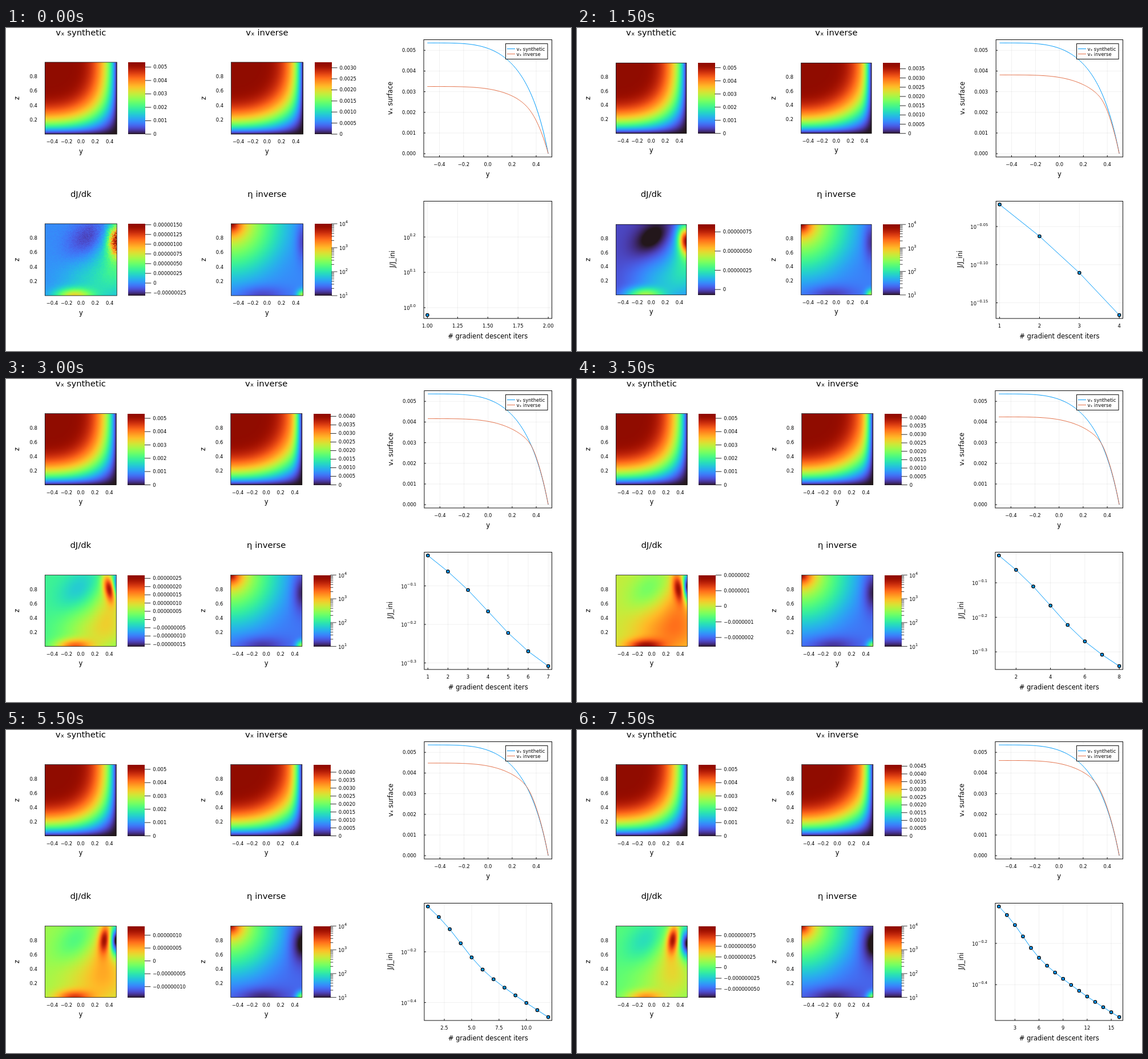
These frames come from a looping animation (990 by 566 pixels, 8 s). An HTML page with a canvas:

```html
<!DOCTYPE html>
<html>
<head>
<meta charset="utf-8">
<style>
html, body { margin: 0; width: 990px; height: 566px; overflow: hidden; background: #fff; }
canvas { display: block; }
</style>
</head>
<body>
<canvas id="stage" width="990" height="566"></canvas>
<script>
const ctx = document.getElementById('stage').getContext('2d');
const FONT = '"DejaVu Sans", sans-serif';
const BLUE = '#009afa', ORANGE = '#e36f47';
const N = 126, RIGHT = 956.5, VMAX = 0.00536, STEPS = 16;

const bell = (d, s) => Math.exp(-d * d / (2 * s * s));
const hash = (i, j) => {
  const s = Math.sin(i * 12.9898 + j * 78.233) * 43758.5453;
  return s - Math.floor(s) - .5;
};

// log10 of the misfit: a steady descent, fastest around the fourth step
const misfit = [-.0211];
for (let i = 1; i < STEPS; i++)
  misfit.push(misfit[i - 1] - (.0385 - .001 * i + .022 * bell(i - 3.65, 1.45)));

function turbo(x) {
  const t = Math.min(1, Math.max(0, x));
  return [
    34.61 + t * (1172.33 - t * (10793.56 - t * (33300.12 - t * (38394.49 - t * 14825.05)))),
    23.31 + t * (557.33 + t * (1225.33 - t * (3574.96 - t * (1073.77 + t * 707.56)))),
    27.2 + t * (3211.1 - t * (15327.97 - t * (27814 - t * (22569.18 - t * 6838.66))))
  ];
}

// Scalar fields: u runs left to right, z bottom to top, both 0..1
const synth = u => 1 - .78 * u ** 4 - .22 * u ** 11;
const flow = profile => (u, z) => {
  const w = 1 - z;
  return profile(u) * (1 - w ** 4) * (1 - (u * w) ** 2);
};

// Inverse surface speed: a plateau that meets the wall profile
const inverseTop = step => .00475 - .0015 * Math.exp(-step / 6.4);

function inverseProfile(step) {
  const k = 10 + step, top = inverseTop(step);
  const scale = 1.03 - .33 * Math.exp(-((step / 2.8) ** 1.8));
  const raw = u => {
    const flat = top * (1 - .5 * u ** 4), wall = VMAX * scale * synth(u);
    return wall <= 1e-9 ? 0 : (flat ** -k + wall ** -k) ** (-1 / k);
  };
  const full = raw(0);
  return u => raw(u) / full;
}

// The gradient at the right wall changes sign at about step 5
const flip = step => 1 / (1 + Math.exp((5.3 - step) / .5));

// Colour range in units of 1e-7; the first step is noisy and spreads it
function gradientRange(step) {
  const hi = 2.4 - .095 * step + 9.4 * Math.exp(-((step / 4.3) ** 2.6));
  const lo = -1.5 * Math.exp(-step / 4) - 8.8 * Math.exp(-step / 5.8) * flip(step) ** 4;
  const spread = step === 0 ? hi - lo : 0;
  return [lo - .13 * spread, hi + .26 * spread];
}

function gradientField(step) {
  const [lo, hi] = gradientRange(step), f = flip(step);
  const zero = -lo / (hi - lo);
  const dipU = .4 + .19 * Math.exp(-step / 6);
  const peakU = 1 - f * (.06 + .0095 * step), peakZ = .77 + .05 * f;
  const tilt = .3 * bell(step - 6, 2) - .1 * f;
  const broad = .13 + .08 * bell(step - 5, 2);
  return (u, z, i, j) => {
    const core = bell(u - peakU - tilt * (peakZ - z), .075 - .018 * f) * bell(z - peakZ, .14);
    const halo = bell(u - peakU, .16) * bell(z - .62, .28);
    let t = zero + (1 - zero) * (.72 * core + .24 * halo)
      - .11 * bell(u - dipU - .45 * (z - .8), .19) * bell(z - .8, .2)
      - 1.2 * f * zero * bell(u - 1, .02 + .0035 * step) * bell(z - .9 + .01 * step, .14)
      + (.38 - .009 * step) * bell(u - .4, .18) * bell(z, .07)
      + broad * bell(u - .75, .35) * bell(z - .2, .26);
    if (step === 0) t += hash(i, j) * (.015 + .05 * u * z + .4 * core);
    return t;
  };
}

function viscosityField(step) {
  const p = Math.min(1, step / 12);
  return (u, z) => {
    const r = Math.hypot(u, 1 - z);
    return .17 - .05 * p + .32 * Math.exp(-((r / .7) ** 3)) + .5 * Math.exp(-((r / .18) ** 1.3))
      - (.11 + .05 * p) * bell(u - 1, .07 + .05 * p) * bell(z - .76, .2)
      - .1 * bell(u - .42, .25) * bell(z, .1)
      + .38 * bell(u - 1, .055) * bell(z, .055);
  };
}

// Drawing helpers
function text(s, x, y, size = 8.4, align = 'center') {
  ctx.font = size + 'px ' + FONT;
  ctx.textAlign = align;
  ctx.fillStyle = '#000';
  ctx.fillText(s, x, y);
}

function upright(s, x, y) {
  ctx.save();
  ctx.translate(x, y);
  ctx.rotate(-Math.PI / 2);
  text(s, 0, 0, 11.5);
  ctx.restore();
}

function path(points, color, width = 1) {
  ctx.beginPath();
  points.forEach(([x, y]) => ctx.lineTo(x, y));
  ctx.strokeStyle = color;
  ctx.lineWidth = width;
  ctx.stroke();
}

function box(x, y, w, h, width = 1) {
  ctx.strokeStyle = '#111';
  ctx.lineWidth = width;
  ctx.strokeRect(x, y, w, h);
}

function power(exp, x, y, align) {
  const size = 6.6;
  ctx.font = '8.4px ' + FONT;
  const base = ctx.measureText('10').width;
  ctx.font = size + 'px ' + FONT;
  const left = align === 'right' ? x - base - ctx.measureText(exp).width : x;
  text('10', left, y + 4.3, 8.4, 'left');
  text(exp, left + base, y - .8, size, 'left');
}

function ticks(lo, hi, step) {
  const out = [];
  for (let i = Math.ceil(lo / step - 1e-6); i <= Math.floor(hi / step + 1e-6); i++) out.push(i * step);
  return out;
}

function decimals(step) {
  let d = 0;
  for (; Math.abs(step - Math.round(step)) > 1e-4 || Math.round(step) === 0; d++) step *= 10;
  return d;
}

const format = (v, step) =>
  (Math.abs(v) < step / 2 ? 0 : v).toFixed(decimals(step)).replace('-', '−');

const buffer = document.createElement('canvas');
const bufferCtx = buffer.getContext('2d');

function paint(x, y, w, h, cols, field) {
  buffer.width = cols;
  buffer.height = N;
  const img = bufferCtx.createImageData(cols, N);
  for (let j = 0, o = 0; j < N; j++)
    for (let i = 0; i < cols; i++, o += 4) {
      img.data.set(turbo(field((i + .5) / cols, 1 - (j + .5) / N, i, j)), o);
      img.data[o + 3] = 255;
    }
  bufferCtx.putImageData(img, 0, 0);
  ctx.drawImage(buffer, x, y, w, h);
}

function heatmap(title, x, y, size, titleY, field) {
  const end = y + size, mid = x + size / 2;
  paint(x, y, size, size, N, field);
  box(x, y, size, size, .8);
  text(title, mid, titleY, 14.8);
  ticks(-.4, .4, .2).forEach(v => text(format(v, .2), x + size * (v + .5), end + 16));
  ticks(.2, .8, .2).forEach(v => text(format(v, .2), x - 13.5, end - size * v + 3, 8.4, 'right'));
  text('y', mid, end + 33.5, 11.5);
  upright('z', x - 45, y + size / 2);
  const top = Math.round(y);
  paint(Math.round(x + size + 20), top, 30, Math.round(end) - top, 1, (u, z) => z);
}

function barTicks(x, y, size, lo, hi, step) {
  const edge = x + size + 49.5;
  ticks(lo, hi, step).forEach(v => {
    const ty = y + size * (hi - v) / (hi - lo);
    path([[edge, ty], [edge + 10.5, ty]], '#111', .9);
    text(Math.abs(v) < step / 2 ? '0' : format(v, step), edge + 14.5, ty + 3, 8.4, 'left');
  });
}

function logTicks(x, y, size) {
  const edge = x + size + 49.5;
  for (let d = 0; d <= 3; d++)
    for (let m = 1; m <= (d < 3 ? 9 : 1); m++) {
      const ty = y + size * (1 - (d + Math.log10(m)) / 3);
      path([[edge, ty], [edge + (m === 1 ? 10.5 : 5), ty]], '#111', .8);
      if (m === 1) power(String(d + 1), edge + 14, ty, 'left');
    }
}

function frame(left, top, bottom, xs, ys) {
  xs.forEach(x => path([[x, top], [x, bottom]], 'rgba(0,0,0,.06)'));
  ys.forEach(y => path([[left, y], [RIGHT, y]], 'rgba(0,0,0,.06)'));
  xs.forEach(x => path([[x, bottom], [x, bottom - 3]], '#111'));
  ys.forEach(y => path([[left, y], [left + 3, y]], '#111'));
  box(left, top, RIGHT - left, bottom - top);
}

function surfacePlot(left, top, profile) {
  const x0 = left + 6.35, w = RIGHT - 6.35 - x0;
  const px = u => x0 + w * u, py = v => 220.2 - 36200 * v;
  const xs = ticks(-.4, .4, .2), ys = ticks(0, .005, .001);
  frame(left, 20.5, 226, xs.map(v => px(v + .5)), ys.map(py));
  xs.forEach(v => text(format(v, .2), px(v + .5), 241.5));
  ys.forEach(v => text(format(v, .001), left - 14, py(v) + 3, 8.4, 'right'));
  text('y', (left + RIGHT) / 2, 260, 11.5);
  upright('vₓ surface', left - 55, 123);
  const curve = f => Array.from({ length: 101 }, (_, i) => [px(i / 100), py(f(i / 100))]);
  path(curve(u => VMAX * synth(u)), BLUE);
  path(curve(u => top * profile(u)), ORANGE);
  ctx.fillStyle = '#fff';
  ctx.fillRect(875.5, 27.5, 73.5, 27);
  box(875.5, 27.5, 73.5, 27);
  [['vₓ synthetic', BLUE, 36.5], ['vₓ inverse', ORANGE, 45.5]].forEach(([s, c, y]) => {
    path([[878, y], [892, y]], c);
    text(s, 894.5, y + 3, 8.4, 'left');
  });
}

function misfitRange(step) {
  const lo = misfit[step], hi = step ? misfit[0] : lo + .313;
  return { lo, hi, yStep: [.025, .05, .1, .2].find(s => (hi - lo) / s < 3.53) };
}

function misfitPlot(left, step, extra) {
  const { lo, hi, yStep } = misfitRange(step);
  const n = step + 1, xMax = Math.max(2, n);
  const x0 = left + 6.35, w = RIGHT - 6.35 - x0;
  const px = v => x0 + w * (v - 1) / (xMax - 1);
  const py = v => 309.3 + 193.8 * (hi - v) / (hi - lo);
  const xStep = n < 3 ? .25 : n < 4 ? .5 : n < 8 ? 1 : n < 12 ? 2 : n < 15 ? 2.5 : 3;
  const xs = ticks(1, xMax, xStep), ys = ticks(lo, hi, yStep);
  frame(left, 303.5, 509, xs.map(px), ys.map(py));
  xs.forEach(v => text(format(v, xStep), px(v), 524.5));
  ys.forEach(v => power(format(v, yStep), left - 14, py(v), 'right'));
  text('# gradient descent iters', (left + RIGHT) / 2, 543.5, 11.5);
  upright('J/J_ini', left - 51.5 - 4 * extra, 405);
  const points = misfit.slice(0, n).map((v, i) => [px(i + 1), py(v)]);
  path(points, BLUE);
  points.forEach(([x, y]) => {
    ctx.beginPath();
    ctx.arc(x, y, 2.7, 0, 7);
    ctx.fillStyle = BLUE;
    ctx.fill();
    ctx.strokeStyle = '#000';
    ctx.lineWidth = 1.2;
    ctx.stroke();
  });
}

function draw(step) {
  // Each extra character in the misfit labels squeezes the whole layout
  const extra = decimals(misfitRange(step).yStep) - (step ? 0 : 1);
  const squeeze = Math.max(0, 1.5 * extra - .5);
  const size = 126 - squeeze, y = 60 + squeeze / 2, low = y + 283;
  const x1 = 68.3, x2 = 394.5 - .75 * squeeze, left = 732 + .875 * squeeze;
  const top = inverseTop(step), profile = inverseProfile(step);
  const [lo, hi] = gradientRange(step);
  const gradStep = [.25, .5, 1, 2.5].find(s => (hi - lo) / s <= 9);

  ctx.fillStyle = '#fff';
  ctx.fillRect(0, 0, 990, 566);
  heatmap('vₓ synthetic', x1, y, size, 13, flow(synth));
  barTicks(x1, y, size, 0, VMAX, .001);
  heatmap('vₓ inverse', x2, y, size, 13, flow(profile));
  barTicks(x2, y, size, 0, top, .0005);
  heatmap('dJ/dk', x1, low, size, 296, gradientField(step));
  barTicks(x1, low, size, lo * 1e-7, hi * 1e-7, gradStep * 1e-7);
  heatmap('η inverse', x2, low, size, 296, viscosityField(step));
  logTicks(x2, low, size);
  surfacePlot(left, top, profile);
  misfitPlot(left, step, extra);
}

let shown = -1;
function tick() {
  const step = Math.floor(performance.now() % 8000 / 500);
  if (step !== shown) draw(shown = step);
  requestAnimationFrame(tick);
}
tick();
</script>
</body>
</html>
```
